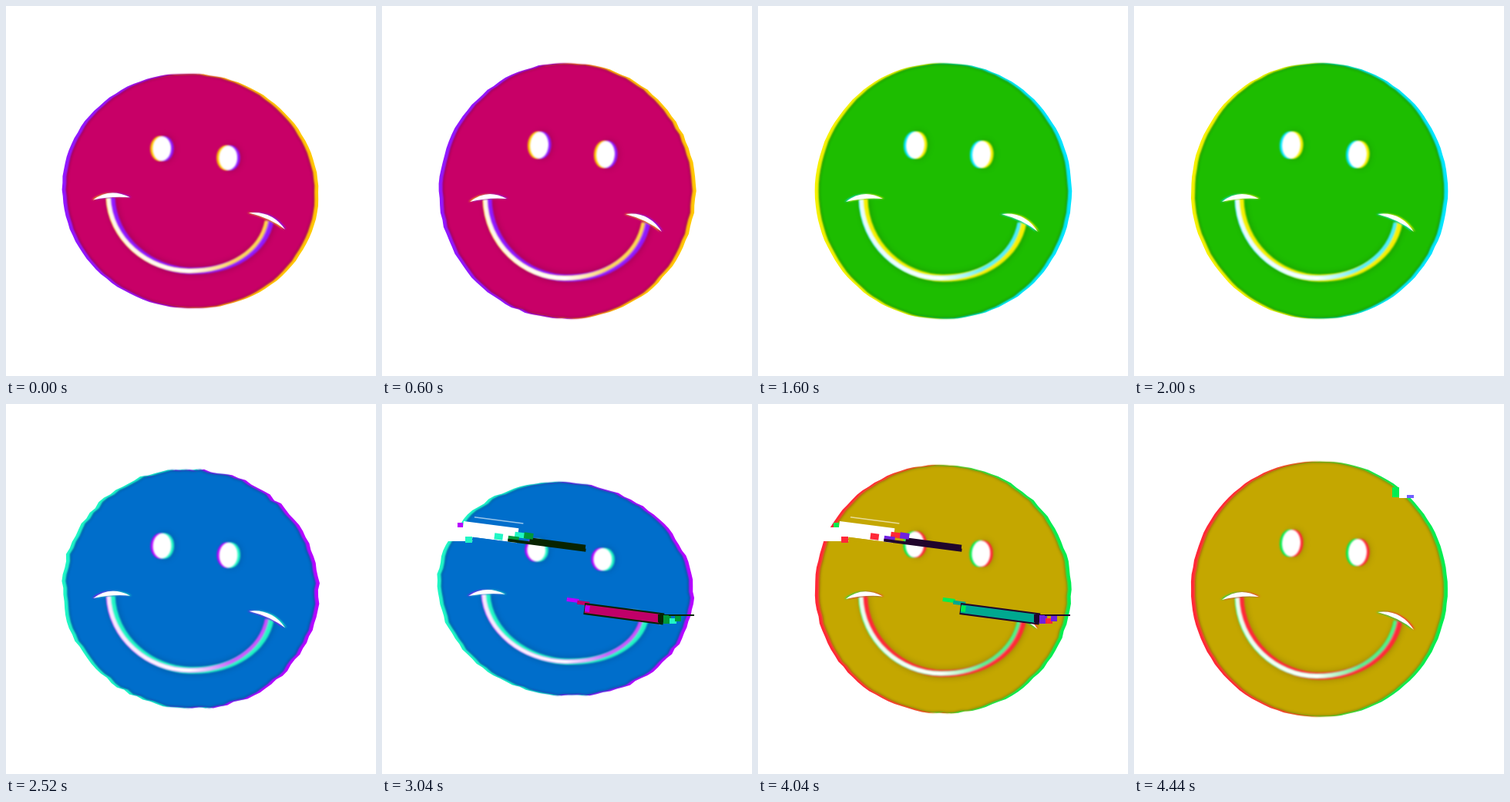
Recreate the animation shown at these times as an HTML page with a canvas. Size 480 by 480 pixels, loop 4480 ms.

```html
<!DOCTYPE html>
<html>
<head>
<meta charset="utf-8">
<style>
html, body { margin: 0; width: 100%; height: 100%; overflow: hidden; background: #fff }
canvas { display: block }
</style>
</head>
<body>
<canvas id="stage" width="480" height="480"></canvas>
<script>
const ctx = document.getElementById('stage').getContext('2d');
const FRAME = 40, BEAT = 14, MID = 240, TILT = .13;

// left and right are the colour fringes, bar and dark belong to the glitch
const palettes = [
  { main: '#c80067', left: '#9018ff', right: '#ffc800', bar: '#62a800', dark: '#041c30', spot: '#00b8a0' },
  { main: '#1dbd00', left: '#f6f000', right: '#00e4ff', bar: '#0a38b4', dark: '#380410', spot: '#f08000' },
  { main: '#006ecb', left: '#20f6c4', right: '#b800ff', bar: '#c00068', dark: '#082400', spot: '#009838' },
  { main: '#c4a700', left: '#ff2838', right: '#00ee50', bar: '#00a890', dark: '#20042c', spot: '#7020e0' }
];

// one beat: height of the face and roughness of its edge
const squash = [.916, 1, 1, .97, .92, .86, .831, .933, 1, 1, 1, 1, 1, 1];
const rough = [.5, .8, .5, .8, 1, 1.2, 1.2, 1.6, .4, .4, .4, .4, .4, .4];

const noise = n => {
  const s = Math.sin(n * 127.1) * 43758.5453;
  return (s - Math.floor(s)) * 2 - 1;
};

function disc(amount, seed) {
  const path = new Path2D(), n = 110;
  for (let i = 0; i < n; i++) {
    const a = i / n * Math.PI * 2, d = noise(i + seed * 61) * amount;
    path.lineTo(240.5 + (161.5 + d) * Math.cos(a), MID + (165.5 + d) * Math.sin(a));
  }
  path.closePath();
  return path;
}

const eyes = new Path2D();
eyes.ellipse(204, 180.5, 12, 17.5, .05, 0, 7);
eyes.closePath();
eyes.moveTo(302, 192.5);
eyes.ellipse(290, 192.5, 12, 17.5, .05, 0, 7);
const smile = new Path2D('M136 250C137 309 186 353 239 353C294 353 334 323 342 281');
const caps = new Path2D('M114 254Q136 236 162 250Q138 248 114 254ZM316 270Q346 266 363 293Q344 277 316 270Z');

function fade(...stops) {
  const g = ctx.createLinearGradient(130, 0, 350, 0);
  for (const [at, alpha] of stops) g.addColorStop(at, `rgba(255,255,255,${alpha})`);
  return g;
}
const shine = fade([0, .9], [.5, 1], [.75, .35], [1, .3]);

function paint(kind, path, color, dx, blur) {
  ctx.save();
  ctx.translate(dx, 0);
  if (blur) ctx.filter = `blur(${blur}px)`;
  ctx[kind + 'Style'] = color;
  ctx[kind](path);
  ctx.restore();
}
const fill = (path, color, dx = 0, blur = 0) => paint('fill', path, color, dx, blur);

function line(path, color, width, dx = 0, blur = 0) {
  ctx.lineWidth = width;
  paint('stroke', path, color, dx, blur);
}

function face(p, body) {
  fill(body, p.left, -5, .7);
  fill(body, p.right, 5, .7);
  fill(body, p.main, 0, .8);
  ctx.save();
  ctx.clip(body);
  line(body, 'rgba(0,0,0,.15)', 4, 0, 1.5);
  ctx.restore();

  fill(eyes, 'rgba(0,0,0,.2)', 4, 4);
  fill(eyes, p.right, -3, 1);
  fill(eyes, p.left, 3.5, 1);
  fill(eyes, '#fff', 0, .9);

  line(smile, 'rgba(0,0,0,.12)', 15, 2, 3);
  line(smile, p.left, 9, 2, 1);
  line(smile, p.right, 4.5, -3, 1);
  line(smile, shine, 6, -2, .9);
  fill(caps, p.right, -2, .8);
  fill(caps, p.left, 2, .8);
  fill(caps, '#fff', 0, .4);
}

function box(color, x, y, w, h) {
  ctx.fillStyle = color;
  ctx.fillRect(x, y, w, h);
}

// draws with the x axis sloping down from (x, y)
function sloped(x, y, draw) {
  ctx.save();
  ctx.translate(x, y);
  ctx.rotate(TILT);
  draw();
  ctx.restore();
}

function glitch(p) {
  box('#fff', 84, 160, 34, 18);
  sloped(106, 152, () => {
    box('#fff', 0, 0, 72, 19);
    box(p.main, 14, 19, 46, 5);
    box(p.left, 42, 10, 11, 8);
    box(p.left, 68, 5, 14, 7);
    box(p.spot, 60, 11, 14, 6);
    box(p.dark, 60, 15, 102, 4);
    box(p.dark, 88, 10, 73, 8);
    box(p.spot, 80, 4, 12, 8);
  });
  box(p.left, 108, 172, 9, 8);
  box(p.right, 98, 154, 7, 6);
  sloped(120, 146, () => box('rgba(255,255,255,.6)', 0, 0, 64, 1.5));

  sloped(240, 251, () => {
    box(p.right, 0, 0, 16, 5);
    box(p.bar, 14, 2, 16, 5);
    box(p.dark, 24, 4, 104, 15);
    box(p.bar, 25, 6, 97, 11);
    box(p.right, 25, 7, 6, 8);
  });
  box(p.dark, 358, 273, 14, 10);
  box(p.spot, 365, 274, 10, 11);
  box(p.left, 373, 278, 9, 7);
  box(p.spot, 380, 275, 8, 7);
  box(p.dark, 372, 273, 33, 2);
}

function spark(p) {
  box('#fff', 344, 106, 22, 16);
  box(p.right, 335, 108, 9, 13);
  box('#7060ff', 354, 118, 9, 4);
}

function render(now) {
  const frame = Math.floor(now / FRAME) % (BEAT * 8);
  const step = frame % BEAT, height = squash[step];
  const p = palettes[Math.floor(frame / (BEAT * 2))];

  box('#fff', 0, 0, 480, 480);
  ctx.save();
  // the face leans, so it is squashed along its own axis
  ctx.translate(MID - 15 * (1 - height), MID);
  ctx.rotate(TILT);
  ctx.scale(1, height);
  ctx.rotate(-TILT);
  ctx.translate(-MID, -MID);
  face(p, disc(rough[step], frame));
  ctx.restore();

  if (step > 1 && step < 7) glitch(p);
  if (step === 13) spark(p);
}

function tick() {
  render(performance.now());
  requestAnimationFrame(tick);
}
tick();
</script>
</body>
</html>
```
